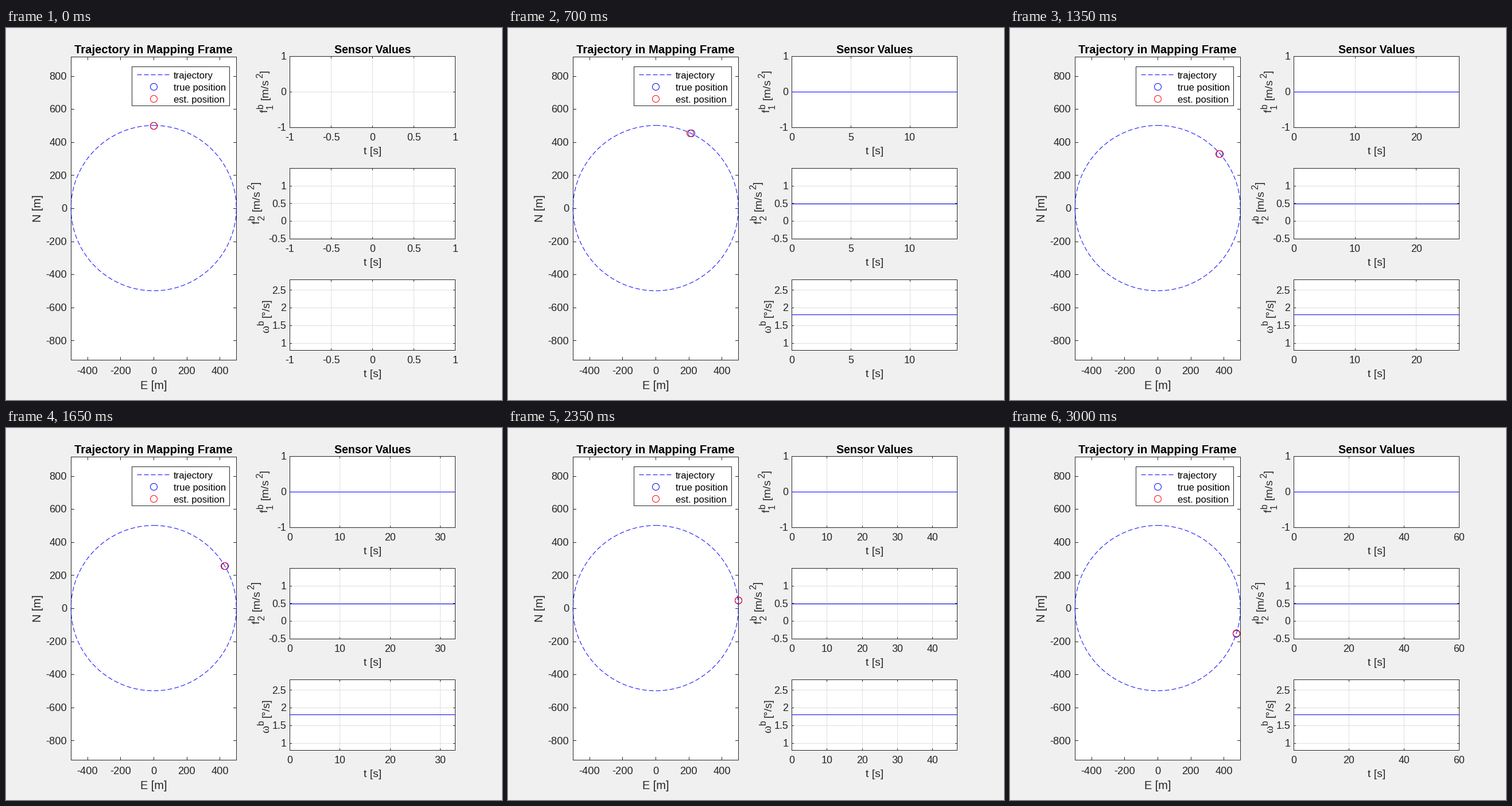
A matplotlib script for the animation above (3050 ms loop, 864 by 648 pixels).

```python
import numpy as np
import matplotlib.pyplot as plt
from matplotlib.animation import FuncAnimation
from matplotlib.patches import Rectangle

plt.rcParams["font.family"] = "Liberation Sans"

W, H, FRAMES, STEP_MS = 864, 648, 61, 50
RADIUS, RATE = 500, 1.8            # metres, degrees per second
INK, GRID, BLUE, RED = "#262626", "#dfdfdf", "#0000ff", "#ff0000"
MAP = (113, 49, 401, 577)          # left, top, right, bottom in pixels
LEFT, RIGHT = 494, 782
DASH = (0, (8, 4))

# top, bottom, value range, ticks, constant reading
PANELS = [
    (48, 172, (-1, 1), (-1, 0, 1), 0),
    (243, 366, (-0.5, 1.5), (-0.5, 0, 0.5, 1), RADIUS * np.radians(RATE) ** 2),
    (437, 560, (0.8, 2.8), (1, 1.5, 2, 2.5), RATE),
]

fig = plt.figure(figsize=(W / 72, H / 72), dpi=72, facecolor="#f0f0f0")
ax = fig.add_axes([0, 0, 1, 1])
# quarter-pixel offset, so whole numbers always snap to that pixel
ax.set_xlim(-0.25, W - 0.25)
ax.set_ylim(H - 0.75, -0.75)
ax.axis("off")


def text(x, y, s, size, color=INK, ha="center", z=6, **kw):
    return ax.text(x, y, s, fontsize=size, color=color, ha=ha,
                   va="baseline", zorder=z, **kw)


def line(color, z, x=(), y=(), **kw):
    return ax.plot(x, y, color=color, lw=1, zorder=z, **kw)[0]


def ring(color, z, x=0, y=0):
    return ax.plot([x], [y], "o", ms=12, mew=1, mfc="none", mec=color, zorder=z)[0]


def box(left, top, right, bottom, z=1):
    ax.add_patch(Rectangle((left, top), right - left, bottom - top,
                           fc="white", ec="none", zorder=z))
    line(INK, z + 2, [left, right, right, left, left],
         [top, top, bottom, bottom, top], solid_joinstyle="miter")


def set_segments(artist, segs):
    """Draw separate (x0, y0, x1, y1) strokes with one line artist."""
    xs, ys = [], []
    for x0, y0, x1, y1 in segs:
        xs += [round(x0), round(x1), np.nan]
        ys += [round(y0), round(y1), np.nan]
    artist.set_data(xs, ys)


def x_marks(xs, top, bottom, size):
    return [s for x in xs for s in ((x, top, x, top + size),
                                    (x, bottom - size, x, bottom))]


def y_marks(ys, left, right, size):
    return [s for y in ys for s in ((left, y, left + size, y),
                                    (right - size, y, right, y))]


def up_text(x, y, s, size, **kw):
    """Text that reads upwards, starting at (x, y)."""
    text(x, y, s, size, ha="left", rotation=90, rotation_mode="anchor", **kw)


# --- map -------------------------------------------------------------
box(*MAP)
text(257, 43, "Trajectory in Mapping Frame", 20.2, "black", weight="bold")
text(257, 628, "E [m]", 20)
up_text(61, 337, "N [m]", 20)
e_ticks = range(-400, 401, 200)
n_ticks = range(-800, 801, 200)
e_texts = [text(0, 602, str(v), 18.3) for v in e_ticks]
n_texts = [text(106, 0, str(v), 18.3, ha="right") for v in n_ticks]
map_marks = line(INK, 3)
path = line(BLUE, 4, ls=DASH, dash_capstyle="butt")
true_ring, est_ring = ring(BLUE, 5), ring(RED, 5.5)

# --- legend ----------------------------------------------------------
box(219, 66, 389, 134, z=7)
line(BLUE, 10, [228, 287], [80, 80], ls=DASH, dash_capstyle="butt")
ring(BLUE, 10, 257, 101)
ring(RED, 10, 257, 122)
for y, s in ((87, "trajectory"), (108, "true position"), (129, "est. position")):
    text(292, y, s, 16.6, "black", ha="left", z=10)

# --- sensor panels ---------------------------------------------------
text(638, 43, "Sensor Values", 19.5, "black", weight="bold")


def force_label(x, y, index):
    up_text(x, y, "f", 19.4)
    up_text(x - 8, y - 6, "b", 15.5)
    up_text(x + 9, y - 6, index, 15.5)
    up_text(x, y - 22, "[m/s", 19.4)
    up_text(x - 9, y - 60, "2", 15.5)
    up_text(x, y - 68, "]", 19.4)


force_label(456, 146, "1")
force_label(441, 340, "2")
up_text(458, 530, "ω", 20, family="Liberation Serif")
up_text(449, 517, "b", 15.5)
up_text(458, 503, "[°/s]", 19)

panels = []
for top, bottom, (lo, hi), ticks, value in PANELS:
    def to_y(v):
        return bottom - (v - lo) * (bottom - top) / (hi - lo)

    box(LEFT, top, RIGHT, bottom)
    rows = [to_y(v) for v in ticks]
    for v, y in zip(ticks, rows):
        text(488, y + 6.5, f"{v:g}", 17.9, ha="right")
    set_segments(line(GRID, 2), [(LEFT, y, RIGHT, y) for y in rows])
    set_segments(line(INK, 3), y_marks(rows, LEFT, RIGHT, 3))
    text(638, bottom + 47, "t [s]", 19.4)
    panels.append(dict(
        top=top, bottom=bottom, grid=line(GRID, 2), marks=line(INK, 3),
        labels=[text(0, bottom + 23, "", 17.9) for _ in range(6)],
        trace=line(BLUE, 4, [LEFT, RIGHT], [round(to_y(value))] * 2)))


def time_ticks(lo, hi):
    """Smallest 1-2-5 step that gives at most five intervals."""
    steps = [m * d for d in (0.1, 1, 10) for m in (1, 2, 5)]
    step = next(s for s in steps if (hi - lo) / s <= 5 + 1e-9)
    return step * np.arange(round(lo / step), int(hi / step + 1e-9) + 1)


def est_error(t):
    """Slow drift of the estimate in metres, east and north."""
    east = np.interp(t, [0, 14, 33, 42, 52, 60], [-2, -4, -3.5, 0, 1.5, -0.5])
    north = np.interp(t, [0, 42, 60], [0, 0, 3])
    return east, north


def draw_map(t):
    left, top, right, bottom = MAP
    a = np.radians(RATE * t)
    e, n = RADIUS * np.sin(a), RADIUS * np.cos(a)
    de, dn = est_error(t)
    # the equal-scaled axes grow when the estimate leaves the circle
    k = (right - left) / (RADIUS + max(RADIUS, e + de))

    def to_x(v):
        return left + (v + RADIUS) * k

    def to_y(v):
        return (top + bottom) / 2 - v * k

    cols, rows = [to_x(v) for v in e_ticks], [to_y(v) for v in n_ticks]
    for label, x in zip(e_texts, cols):
        label.set_x(x)
    for label, y in zip(n_texts, rows):
        label.set_y(y + 6.5)
    set_segments(map_marks, x_marks(cols, top, bottom, 5)
                 + y_marks(rows, left, right, 5))
    turn = np.linspace(0, 2 * np.pi, 201)
    path.set_data(to_x(RADIUS * np.sin(turn)), to_y(RADIUS * np.cos(turn)))
    true_ring.set_data([to_x(e)], [to_y(n)])
    est_ring.set_data([to_x(e + de)], [to_y(n + dn)])


def draw_panels(t):
    lo, hi = (0, t) if t else (-1, 1)
    ticks = time_ticks(lo, hi)
    cols = LEFT + (ticks - lo) * (RIGHT - LEFT) / (hi - lo)
    for p in panels:
        top, bottom = p["top"], p["bottom"]
        set_segments(p["grid"], [(x, top, x, bottom) for x in cols])
        set_segments(p["marks"], x_marks(cols, top, bottom, 3))
        p["trace"].set_visible(t > 0)
        for i, label in enumerate(p["labels"]):
            label.set_visible(i < len(ticks))
            if i < len(ticks):
                label.set_text(f"{ticks[i]:g}")
                label.set_x(cols[i])


def update(t):
    draw_map(t)
    draw_panels(t)
    return []


anim = FuncAnimation(fig, update, frames=FRAMES, interval=STEP_MS,
                     repeat=True, repeat_delay=0, blit=False)
plt.show()
```
